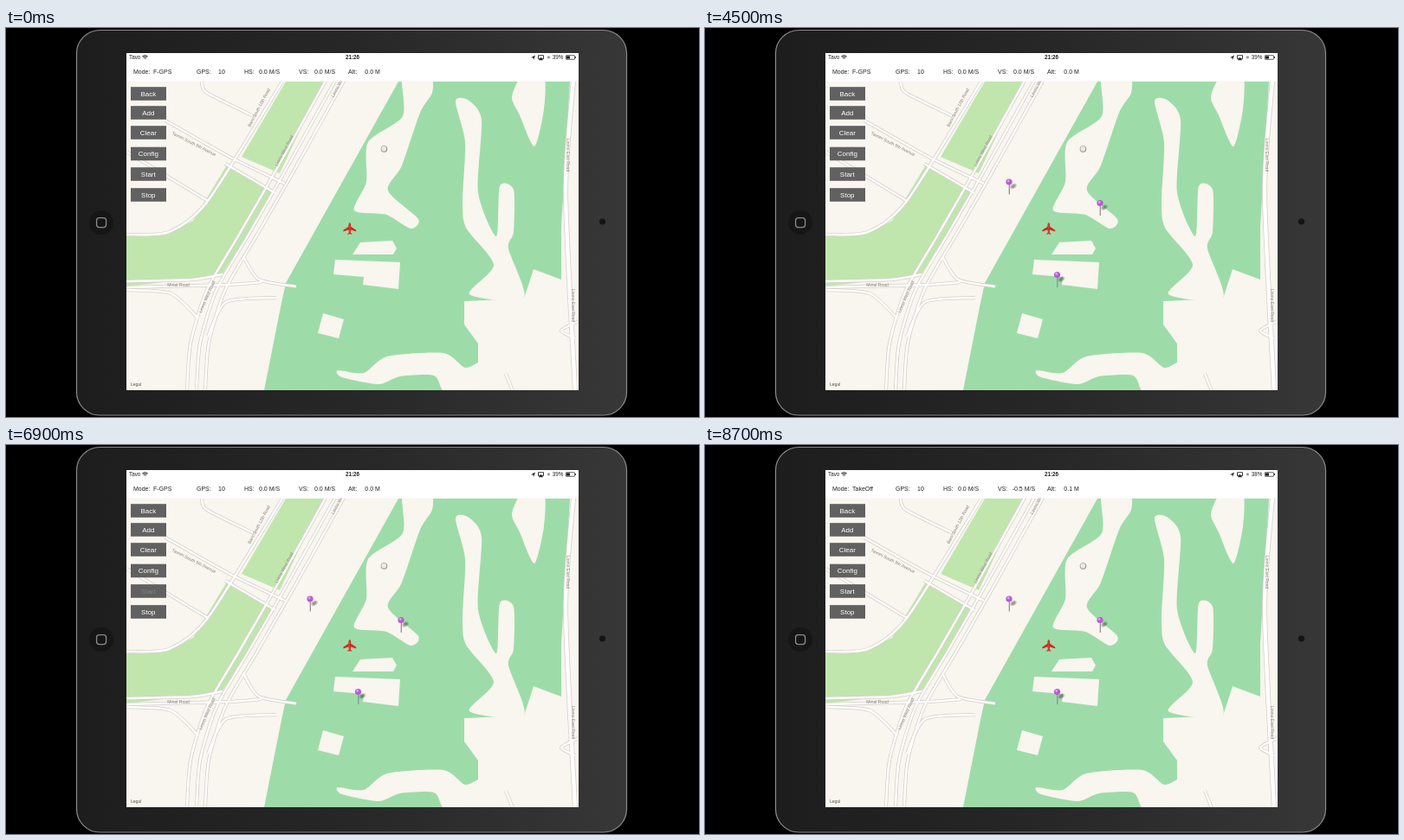
Recreate the animation shown at these times as an HTML page with a canvas. Size 800 by 450 pixels, loop 9000 ms.

```html
<!DOCTYPE html>
<html lang="en">
<head>
<meta charset="utf-8">
<title>Waypoint mission</title>
<style>
html, body { margin: 0; width: 100%; height: 100%; overflow: hidden; background: #000; }
canvas { display: block; width: 800px; height: 450px; }
</style>
</head>
<body>
<canvas id="stage" width="800" height="450"></canvas>
<script>
const g = document.getElementById('stage').getContext('2d');
const LOOP = 9000, STEP = 300;
const FONT = '"Liberation Sans", Arial, sans-serif';
const LAND = '#f9f5ef', GRASS = '#9ddca8', PARK = '#c0e6ae', INK = '#222';

const golf = [453,62, 323,295, 318,318, 298,419, 504,419, 545,388, 545,365, 529,343,
  529,316, 598,313, 609,279, 641,291, 641,230, 651,62];
const finger = [519,85, 533,83, 549,106, 545,190, 566,241, 570,183, 586,187, 586,236,
  580,255, 598,313, 535,308, 563,274, 531,231, 527,200, 530,132];
const bunker = [383,396, 413,399, 440,380, 505,376, 530,393, 549,386, 520,425,
  504,419, 494,402, 455,403, 430,412, 388,404];
const fairway = [458,55, 458,102, 418,132, 416,178, 402,211, 439,216, 467,232, 476,221,
  441,188, 457,159, 478,98, 492,75, 490,55];
const notch = [596,55, 584,80, 593,101, 610,137, 621,94, 621,55];
const plots = [
  [400,262, 409,248, 446,246, 451,255, 447,262],
  [380,268, 455,271, 453,302, 412,297, 413,288, 378,285],
  [366,330, 390,337, 384,359, 360,353]
];
const parks = [
  [323,62, 366,62, 316,168, 272,149],
  [139,240, 187,237, 216,223, 254,160, 309,190, 249,286, 139,299]
];
const highway = [380,61, 319,171, 280,239, 243,303, 224,365, 220,419];
const avenue = [655,61, 646,190, 657,420];
const streets = [
  [319,62, 233,200, 188,236, 139,239],
  [226,62, 232,75, 288,103],
  [184,107, 258,149, 322,180],
  [139,143, 233,200],
  [253,157, 311,191],
  [139,293, 215,291, 250,285],
  [139,300, 258,297, 295,294],
  [275,266, 292,291, 335,299],
  [312,312, 254,317, 233,357],
  [139,303, 190,307, 222,336],
  [661,339, 641,350, 657,359],
  [577,400, 585,420]
];
const labels = [
  ['Baro South 12th Road', 292, 92, -62],
  ['Tavren South 9th Avenue', 217, 134, 27],
  ['Linmo West Road', 321, 142, -62],
  ['Linmo West', 383, 68, -62],
  ['Linmo West Road', 232, 311, -66],
  ['Mirtal Road', 199, 297, 0],
  ['Linmo East Road', 649, 147, 90],
  ['Linmo East Road', 655, 321, 90]
];
const pins = [[351, 178, 2100], [456, 202.5, 2700], [406.5, 285.5, 3300]];

function trace(p) {
  g.beginPath();
  for (let i = 0; i < p.length; i += 2) g.lineTo(p[i], p[i + 1]);
}
// smooth curve through all the points
function curve(p, closed) {
  const n = p.length / 2;
  const at = i => {
    const k = closed ? (i + n) % n : Math.max(0, Math.min(n - 1, i));
    return [p[2 * k], p[2 * k + 1]];
  };
  g.beginPath();
  g.moveTo(p[0], p[1]);
  for (let i = 0; i < (closed ? n : n - 1); i++) {
    const [a, b, c, d] = [at(i - 1), at(i), at(i + 1), at(i + 2)];
    const near = k => b[k] + (c[k] - a[k]) / 8;
    const far = k => c[k] - (d[k] - b[k]) / 8;
    g.bezierCurveTo(near(0), near(1), far(0), far(1), c[0], c[1]);
  }
}
function fill(color) {
  g.fillStyle = color;
  g.fill();
}
function stroke(color, width) {
  g.strokeStyle = color;
  g.lineWidth = width;
  g.stroke();
}
function poly(p, color) {
  trace(p);
  fill(color);
}
function blob(p) {
  curve(p, true);
  fill(LAND);
}
function line(p, color, width) {
  trace(p);
  stroke(color, width);
}
function disc(x, y, r, color) {
  g.beginPath();
  g.arc(x, y, r, 0, Math.PI * 2);
  fill(color);
}
function round(x, y, w, h, r) {
  g.beginPath();
  g.roundRect(x, y, w, h, r);
}
function text(s, x, y, size, color = INK, align = 'left', weight = '') {
  g.font = `${weight} ${size}px ${FONT}`;
  g.textAlign = align;
  g.fillStyle = color;
  g.fillText(s, x, y);
}

function drawTablet() {
  g.fillStyle = '#000';
  g.fillRect(0, 0, 800, 450);
  const shade = g.createLinearGradient(82, 0, 716, 0);
  ['#1d1d1d', '#272727', '#373737'].forEach((c, i) => shade.addColorStop(i / 2, c));
  round(81.5, 2.5, 635, 445.5, 27);
  fill(shade);
  stroke('#8b8b8b', 1.2);
  disc(110, 225, 14, '#161616');
  round(104.6, 219.6, 11, 11, 3);
  stroke('#8a8a8a', 1.3);
  disc(688.5, 224, 3.6, '#141416');
}

function drawRoads(color, extra) {
  for (const shift of [-11, 0, 10]) {
    curve(highway.map((v, i) => i % 2 ? v : v + shift));
    stroke(color, 3 + extra);
  }
  for (const s of streets) {
    curve(s);
    stroke(color, 3 + extra);
  }
  curve(avenue);
  stroke(color, 5 + extra);
}

function drawMap() {
  g.fillStyle = LAND;
  g.fillRect(139, 61, 522, 358);
  parks.forEach(p => poly(p, PARK));
  poly(golf, GRASS);
  [finger, bunker, fairway, notch].forEach(blob);
  plots.forEach(p => poly(p, LAND));
  g.lineJoin = 'round';
  drawRoads('#d3cfca', 1);
  drawRoads('#fffefc', -0.5);
  for (const [s, x, y, turn] of labels) {
    g.save();
    g.translate(x, y);
    g.rotate(turn * Math.PI / 180);
    text(s, 0, 1.7, 5, '#858079', 'center');
    g.restore();
  }
  text('Legal', 144, 414, 5, '#555');
}

function drawPlane() {
  g.save();
  g.translate(396.8, 231.8);
  for (const side of [1, -1]) {
    g.scale(side, 1);
    poly([0,-7, 1.3,-5, 1.4,-2, 7.4,2, 7.4,3.6, 1.3,1.8, 1,4.7, 3,7, 0,6.4], '#d5281d');
  }
  g.restore();
}

function drawPin(x, y) {
  g.save();
  g.translate(x + 5, y + 5);
  g.rotate(-0.5);
  g.scale(1, 0.65);
  disc(0, 0, 4, 'rgba(50,50,50,.25)');
  disc(0, 0, 2.5, 'rgba(50,50,50,.3)');
  g.restore();
  line([x + 0.3, y, x + 0.3, y + 14.5], '#8c8c8c', 1.2);
  disc(x, y, 3.6, '#b65bd6');
  disc(x - 0.8, y - 1, 1.4, '#dca4ee');
}

function drawStatus(t) {
  g.fillStyle = '#fff';
  g.fillRect(139, 29, 522, 32.5);
  text('Tavo', 142, 36.3, 6.3);
  for (const r of [1.5, 3.2, 4.8]) {
    g.beginPath();
    g.arc(160.5, 36.5, r, -2.3, -0.84);
    stroke(INK, 1);
  }
  text('21:26', 400, 36.3, 6.3, INK, 'center', 'bold');
  poly([606,34.3, 611,31.5, 609,37, 608.6,34.5], INK);
  round(614.5, 31.7, 6, 4, 0);
  stroke(INK, 0.9);
  poly([617.5,33.7, 620,37.2, 615,37.2], INK);
  g.fillStyle = '#999';
  g.fillRect(625, 32.5, 2.8, 2.8);
  text(t >= 8400 ? '38%' : '39%', 630.7, 36.3, 6.3);
  round(646.3, 31.7, 10.2, 4.6, 0.5);
  stroke(INK, 0.7);
  g.fillStyle = INK;
  g.fillRect(647, 32.4, 4, 3.2);
  g.fillRect(657, 33.1, 0.9, 1.8);

  const up = t >= 8700;
  const fields = [
    ['Mode:', 147, t >= 8100 ? 'TakeOff' : 'F-GPS', 170],
    ['GPS:', 220, '10', 245],
    ['HS:', 275, '0.0 M/S', 292],
    ['VS:', 338, up ? '-0.5 M/S' : '0.0 M/S', up ? 354.7 : 356],
    ['Alt:', 395, up ? '0.1 M' : '0.0 M', 414.3]
  ];
  for (const [name, x, value, vx] of fields) {
    text(name, x, 53.3, 7);
    text(value, vx, 53.3, 7);
  }
}

function drawButtons(t) {
  const adding = t >= 1800 && t < 3900;
  const buttons = [
    ['Back', 76],
    [adding ? 'Finished' : 'Add', 98, t === 1500 || t === 3600],
    ['Clear', 121],
    ['Config', 145.5],
    ['Start', 169, t === 6900],
    ['Stop', 193]
  ];
  for (const [name, y, pressed] of buttons) {
    g.fillStyle = 'rgba(74,74,74,.86)';
    g.fillRect(144, y - 7.8, 41, 15.6);
    text(name, 164.3, y + 2.8, 8, pressed ? 'rgba(255,255,255,.2)' : '#fff', 'center');
  }
}

function drawAlert(message) {
  g.fillStyle = 'rgba(0,0,0,.4)';
  g.fillRect(139, 29, 522, 390);
  round(331, 197, 137.5, 54, 4);
  fill('#f6f7f4');
  line([331, 229.5, 468.5, 229.5], '#e0e2de', 0.7);
  text(message, 399.7, 217, 6.85, INK, 'center');
  text('OK', 399.7, 243.5, 8.5, '#17889a', 'center', 'bold');
}

function draw(t) {
  drawTablet();
  g.save();
  g.beginPath();
  g.rect(139, 29, 522, 390);
  g.clip();
  drawMap();
  disc(436.5, 140, 3.8, '#8f8f8b');
  disc(436.3, 139.7, 3, '#e9e9e5');
  drawPlane();
  for (const [x, y, start] of pins) if (t >= start) drawPin(x, y);
  drawStatus(t);
  drawButtons(t);
  if (t >= 6000 && t < 6600) drawAlert('Prepare Mission Finished');
  if (t >= 7200 && t < 7800) drawAlert('Mission Started');
  g.restore();
}

const begin = performance.now();
let shown = -1;
function tick() {
  const t = Math.floor((performance.now() - begin) % LOOP / STEP) * STEP;
  if (t !== shown) draw(shown = t);
  requestAnimationFrame(tick);
}
tick();
</script>
</body>
</html>
```
